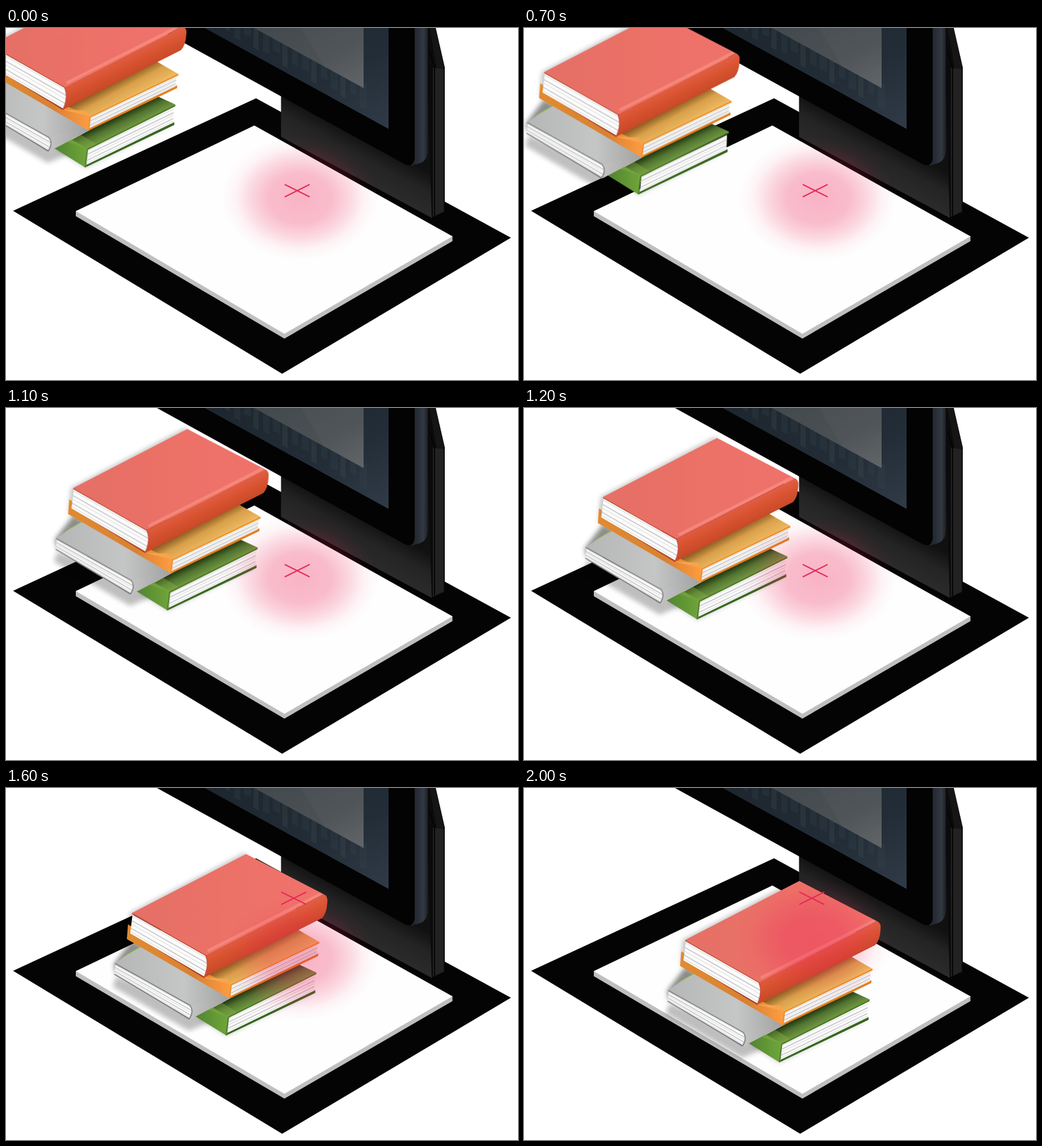
Recreate the animation shown at these times as an HTML page. Size 902x621 px, loop 3000 ms.

```html
<!DOCTYPE html>
<html lang="en">
<head>
<meta charset="utf-8">
<title>Books on a scanner</title>
<style>
  html, body { margin: 0; width: 100%; height: 100%; overflow: hidden; background: #fff; }
  svg { display: block; width: 902px; height: 621px; }
</style>
</head>
<body>
<svg viewBox="0 0 902 621">
  <defs>
    <filter id="soft" x="-30%" y="-30%" width="160%" height="160%"><feGaussianBlur stdDeviation="4"/></filter>
    <radialGradient id="pink">
      <stop offset="0" stop-color="#ee2358" stop-opacity=".34"/>
      <stop offset=".4" stop-color="#ee2358" stop-opacity=".3"/>
      <stop offset=".62" stop-color="#ee2358" stop-opacity=".18"/>
      <stop offset=".82" stop-color="#ee2358" stop-opacity=".05"/>
      <stop offset="1" stop-color="#ee2358" stop-opacity="0"/>
    </radialGradient>
    <linearGradient id="stand" gradientUnits="userSpaceOnUse" x1="590" y1="172" x2="560" y2="228">
      <stop offset="0" stop-color="#111"/><stop offset=".5" stop-color="#242424"/><stop offset="1" stop-color="#2a2a2a"/>
    </linearGradient>
    <linearGradient id="rim" gradientUnits="userSpaceOnUse" x1="718" y1="0" x2="743" y2="0">
      <stop offset="0" stop-color="#20252d"/><stop offset=".7" stop-color="#323943"/><stop offset="1" stop-color="#1d2127"/>
    </linearGradient>
    <linearGradient id="screen" x1="0" y1="0" x2="1" y2="1">
      <stop offset="0" stop-color="#1d262e"/><stop offset=".6" stop-color="#232d37"/><stop offset="1" stop-color="#303b48"/>
    </linearGradient>
    <linearGradient id="pane" x1="0" y1="0" x2="1" y2="1">
      <stop offset="0" stop-color="#42494d"/><stop offset=".6" stop-color="#4c5154"/><stop offset="1" stop-color="#606466"/>
    </linearGradient>
    <linearGradient id="redTop" x1="0" y1="0" x2="1" y2="0">
      <stop offset="0" stop-color="#e57066"/><stop offset=".5" stop-color="#ec7167"/><stop offset="1" stop-color="#f0736b"/>
    </linearGradient>
    <linearGradient id="redSpine" gradientUnits="userSpaceOnUse" x1="505" y1="292" x2="522" y2="327">
      <stop offset="0" stop-color="#e35f46"/><stop offset=".45" stop-color="#d95431"/><stop offset="1" stop-color="#c84927"/>
    </linearGradient>
    <linearGradient id="orangeTop" gradientUnits="userSpaceOnUse" x1="505" y1="333" x2="524" y2="368">
      <stop offset="0" stop-color="#8f6024"/><stop offset=".4" stop-color="#d9a04a"/><stop offset="1" stop-color="#efbb63"/>
    </linearGradient>
    <linearGradient id="orangeSpine" x1="0" y1="0" x2="1" y2="0">
      <stop offset="0" stop-color="#e18b31"/><stop offset=".65" stop-color="#d98132"/><stop offset="1" stop-color="#ff9d42"/>
    </linearGradient>
    <linearGradient id="greenTop" gradientUnits="userSpaceOnUse" x1="515" y1="390" x2="529" y2="418">
      <stop offset="0" stop-color="#22360f"/><stop offset=".4" stop-color="#517431"/><stop offset="1" stop-color="#7ba045"/>
    </linearGradient>
    <linearGradient id="greenSpine" x1="0" y1="0" x2="1" y2="0">
      <stop offset="0" stop-color="#4f8230"/><stop offset="1" stop-color="#70a63a"/>
    </linearGradient>
    <linearGradient id="grayTop" x1="0" y1="0" x2="1" y2="0">
      <stop offset="0" stop-color="#b5b6b6"/><stop offset=".6" stop-color="#c5c6c6"/><stop offset="1" stop-color="#a2a2a2"/>
    </linearGradient>
    <linearGradient id="graySpine" x1="0" y1="0" x2="1" y2="0">
      <stop offset="0" stop-color="#c4c4c4"/><stop offset="1" stop-color="#a2a2a2"/>
    </linearGradient>
    <clipPath id="screenClip"><path d="M350 0H674V178Z"/></clipPath>
  </defs>

  <rect width="902" height="621" fill="#fff"/>
  <path fill="#040404" d="M12.5 322.5 440.5 124 889.5 370 486.5 610Z"/>
  <path fill="#bfbfbf" d="M123 323V332L490.5 548 786.5 376V367Z"/>
  <path fill="#fefefe" d="M123 323 437.5 172 786.5 367.5 490.5 539.5Z"/>

  <g id="monitor">
    <path fill="url(#stand)" d="M484.5 110V192L750 335 757 0Z"/>
    <path fill="#0b0b0b" d="M740 0H757L773 70V325L750 335Z"/>
    <path fill="#222" d="M752 70 771 72V324L752 333Z"/>
    <path fill="#151515" d="M746 0H757L773 70 759 72Z"/>
    <path fill="none" stroke="#050505" stroke-width="2" d="M746 40 755 70V331"/>
    <path fill="url(#rim)" d="M716 0H743V218Q742 234 728 239L714 243Z"/>
    <path fill="#030303" d="M266 0H720V226Q720 246 704 241L484.5 120.5Z"/>
    <path fill="url(#screen)" d="M350 0H674V178Z"/>
    <g id="shelves" clip-path="url(#screenClip)"></g>
    <path fill="url(#pane)" d="M437 0H630V106Z"/>
    <path fill="#777b7c" opacity=".1" d="M520 0H630V106L560 67Z"/>
  </g>

  <g id="books">
    <g filter="url(#soft)">
      <path opacity=".25" d="M256 380 250 398 384 476 425 459 380 425Z"/>
      <path opacity=".24" d="M280 268 482 162 500 180 300 320 276 312Z"/>
      <path opacity=".45" d="M252 358 284 316 330 340 290 380 255 374Z"/>
      <path opacity=".2" d="M398 452 450 485 600 410 590 390Z"/>
    </g>

    <path fill="#8fb545" d="M269 346 277 339 304 324V340Z"/>
    <path fill="#37671e" d="M450 484 607 409V404L454 476Z"/>
    <g class="pages" data-quad="455 452 606 379 605 405 453 479"></g>
    <path fill="url(#greenTop)" d="M425 436 572 356 609 373V376L454 453Z"/>
    <path fill="url(#greenSpine)" d="M392 448 425 434 454 451 450 484Z"/>
    <path fill="#83ae45" d="M415 438 440 425 470 443 454 451Z" opacity=".4"/>
    <path fill="none" stroke="#487923" stroke-width="2" d="M454 452 608 375M450 484 454 452"/>

    <path fill="#777" d="M253 374 384 456 388 451 254 371Z"/>
    <g class="pages" data-quad="255 359 391 434 386 454 253 375"></g>
    <path fill="url(#grayTop)" d="M254 357 272 344 303 326 456 412 456 418 391 434Z"/>
    <path fill="url(#graySpine)" d="M388 433 403 426 456 414V419L386 456Q394 445 388 433Z"/>
    <path fill="none" stroke="#858585" stroke-width="2" d="M254 357 386 431Q394 441 385 455L253 376"/>

    <path fill="#e4801f" d="M456 419 612 344V339L459 411Z"/>
    <g class="pages" data-quad="459 396 611 324 609 341 457 415"></g>
    <path fill="url(#orangeTop)" d="M405 380 574 296 614 319V322L459 395Z"/>
    <path fill="url(#orangeSpine)" d="M277 288 411 373 459 394 456 419 275 314Z"/>
    <path fill="#f5a54d" d="M410 382 452 384 459 394Z"/>
    <path fill="none" stroke="#f28b22" stroke-width="2" d="M456 418 459 395 614 320"/>

    <path fill="#a84325" d="M281 303 411 383 416 376 284 299Z"/>
    <g class="pages" data-quad="285 271 420 347 413 381 281 304"></g>
    <path fill="url(#redTop)" d="M284 268 485 164 622 235 414 342Z"/>
    <path fill="url(#redSpine)" d="M414 342 622 235Q630 238 628 251 627 268 619 277L411 382Q422 358 414 342Z"/>
    <path fill="none" stroke="#f98e82" stroke-width="5" opacity=".75" d="M417 335 617 234"/>
    <path fill="none" stroke="#c94f3b" stroke-width="2" d="M284 269 414 343Q421 360 411 382"/>
  </g>

  <ellipse id="glow" cx="518" cy="300" rx="138" ry="110" fill="url(#pink)"/>
  <path id="cross" fill="none" stroke="#e62a55" stroke-width="2.2" d="M-22-11 22 11M-22 11 22-11"/>
</svg>

<script>
const LOOP = 3000, STEP = 100, START = 500, MOVES = 15;
const TRAVEL = [310.5, 238];
const get = id => document.getElementById(id);

function addPath(parent, attrs) {
  const path = document.createElementNS('http://www.w3.org/2000/svg', 'path');
  for (const name in attrs) path.setAttribute(name, attrs[name]);
  parent.append(path);
}

// Page block: corners run top-left, top-right, bottom-right, bottom-left.
for (const block of document.querySelectorAll('.pages')) {
  const [ax, ay, bx, by, cx, cy, dx, dy] = block.dataset.quad.split(' ').map(Number);
  const mix = (a, b, f) => a + (b - a) * f;
  addPath(block, { d: `M${ax} ${ay} ${bx} ${by} ${cx} ${cy} ${dx} ${dy}Z`, fill: '#fcfcfc' });
  [.08, .32, .5, .72, .9].forEach((f, i) => addPath(block, {
    d: `M${mix(ax, dx, f)} ${mix(ay, dy, f)} ${mix(bx, cx, f)} ${mix(by, cy, f)}`,
    stroke: i % 2 ? '#c9c9c9' : '#dedede', 'stroke-width': i % 2 ? 1.8 : 1.2
  }));
}

// Dim book spines reflected on the screen.
for (let i = 0; i < 15; i++) {
  const x = 385 + i * 17, y = (x - 350) * .55 - 62 + 9 * Math.sin(i * 2.3), w = 9 + i % 3 * 2;
  addPath(get('shelves'), {
    d: `M${x} ${y}l${w} 5v44l-${w}-5Z`,
    fill: i % 3 ? '#35434d' : '#43504f', opacity: .25
  });
}

function draw() {
  const t = performance.now() % LOOP;
  const moved = Math.max(0, Math.min(MOVES, Math.floor((t - START) / STEP) + 1));
  const left = moved / MOVES - 1;
  get('books').setAttribute('transform', `translate(${TRAVEL[0] * left} ${TRAVEL[1] * left})`);
  get('cross').setAttribute('transform', t < 1600 ? 'translate(513 287)' : 'translate(507 194.5)');
  get('glow').setAttribute('transform', t < 2000 ? '' : 'translate(-8 -32)');
  requestAnimationFrame(draw);
}
draw();
</script>
</body>
</html>
```
